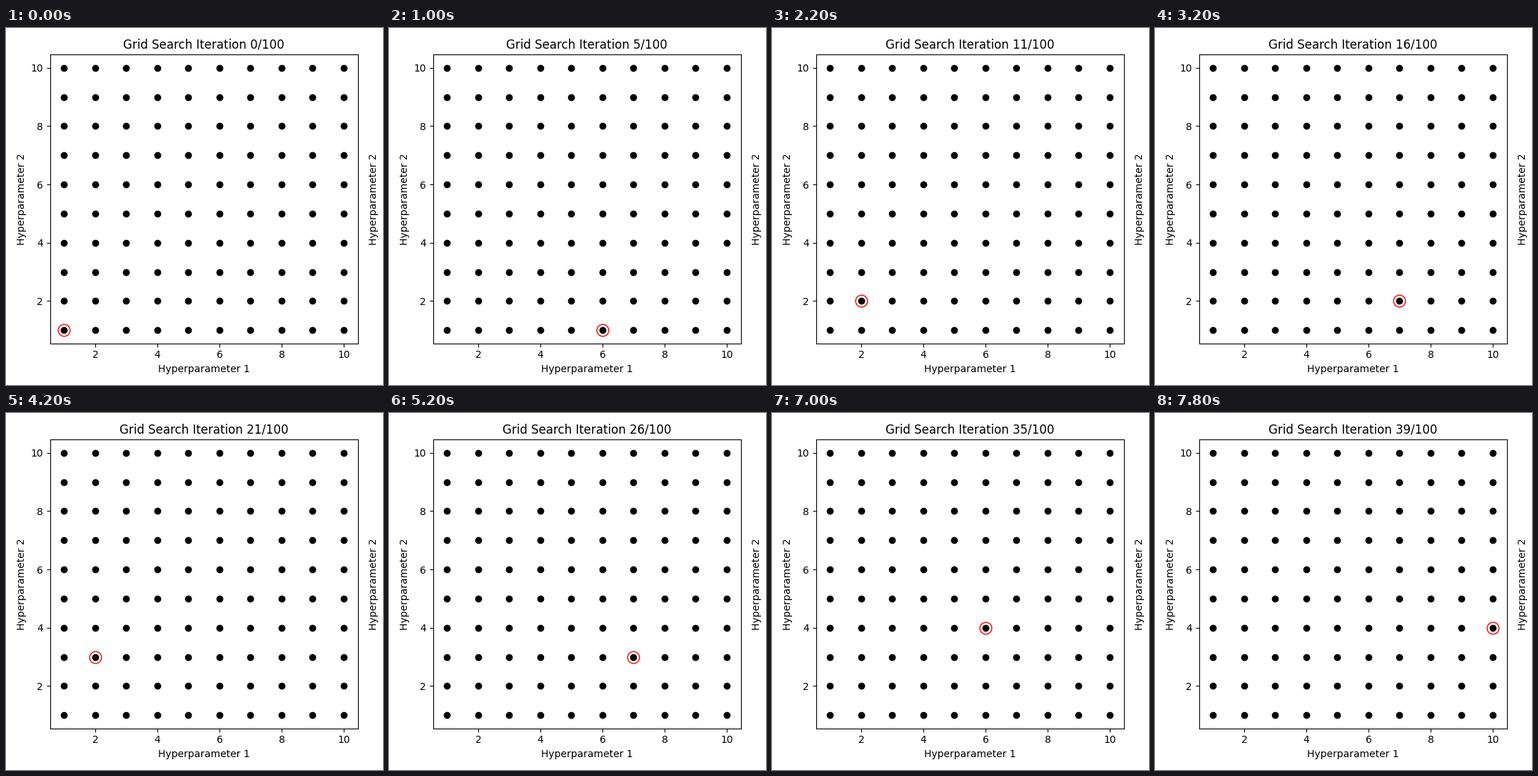
A matplotlib script that plays this animation: 528 by 500 pixels, repeating every 8 s.

```python
import numpy as np
import matplotlib.pyplot as plt
from matplotlib.animation import FuncAnimation

WIDTH, HEIGHT, DPI = 528, 500, 100
PANEL_STEP = 492.5  # distance between neighbouring panels, in pixels
SIDE = 10
FRAMES, INTERVAL = 40, 200

plt.rcParams["font.family"] = "DejaVu Sans"

fig, ax = plt.subplots(figsize=(WIDTH / DPI, HEIGHT / DPI), dpi=DPI)

values = np.arange(1, SIDE + 1)
xs, ys = (g.ravel() for g in np.meshgrid(values, values))

ax.plot(xs, ys, "ko")
ring, = ax.plot([], [], "o", ms=12, mfc="none", mec="red")
ax.set_xlabel("Hyperparameter 1")
ax.set_ylabel("Hyperparameter 2")
title = ax.set_title(f"Grid Search Iteration 0/{SIDE ** 2}")

fig.tight_layout()
fig.subplots_adjust(right=PANEL_STEP / WIDTH)

# The next panel starts beyond the right edge; only its axis label is in view.
fig.canvas.draw()
label = ax.yaxis.label
box = label.get_window_extent()
fig.text((box.x1 + PANEL_STEP) / WIDTH, (box.y0 + box.y1) / 2 / HEIGHT,
         label.get_text(), rotation=90, rotation_mode="anchor",
         ha="center", va="bottom")


def update(i):
    ring.set_data([xs[i]], [ys[i]])
    title.set_text(f"Grid Search Iteration {i}/{SIDE ** 2}")
    return ring, title


anim = FuncAnimation(fig, update, frames=FRAMES, init_func=lambda: update(0),
                     interval=INTERVAL, repeat=True, repeat_delay=0)
plt.show()
```
